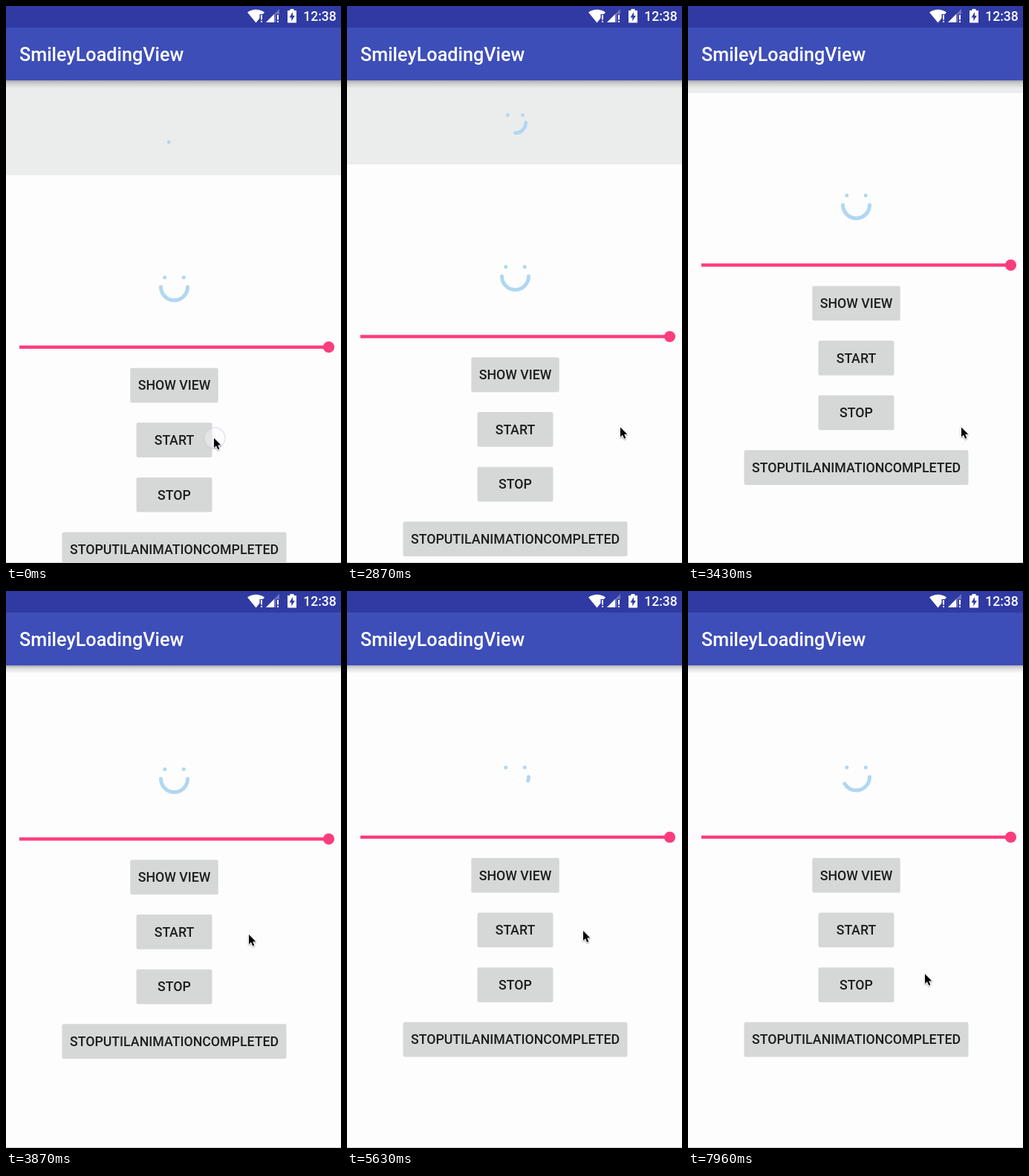
Animation, 451 px wide and 749 px high, one loop 8 s. Source, as an HTML page with a canvas:

```html
<!DOCTYPE html>
<html lang="en">
<head>
<meta charset="utf-8">
<title>SmileyLoadingView</title>
<style>
html, body { margin: 0; width: 100%; height: 100%; overflow: hidden; background: #fdfdfd; }
canvas { display: block; }
</style>
</head>
<body>
<canvas id="stage" width="451" height="749"></canvas>
<script>
const ctx = document.getElementById('stage').getContext('2d');
const W = 451, H = 749, MID = 226.5, LOOP = 8000;
const FONT = 'Roboto, "Noto Sans", sans-serif';
const BLUE = '#b0d7f2', PINK = '#fc3d7d', STATUS = '#303aa3', BAR = '#3d4eb8';
const SPIN = 0.366;  // loader speed, degrees per ms
const START = 4848;  // the lower loader begins to turn
const FLING = 3007;  // the header begins to collapse

const BUTTONS = [['SHOW VIEW', 118.5], ['START', 102], ['STOP', 102], ['STOPUTILANIMATIONCOMPLETED', 302]];

// Pointer glides: begin, end, x, y
const GLIDES = [
  [50, 950, 367, 558], [1390, 2100, 368, 566.5], [3430, 3870, 327, 462],
  [3960, 4500, 268, 471], [4790, 5350, 318, 457], [7290, 7960, 319, 515]
];

const decay = (dt, tau) => Math.exp(-Math.max(0, dt) / tau);
const spin = (from, dt) => 90 + (from - 90 + dt * SPIN) % 720;

function ease(t, begin, end) {
  const p = Math.min(1, Math.max(0, (t - begin) / (end - begin)));
  return p * p * (3 - 2 * p);
}

// Everything below the header hangs on the slider's height
function sliderY(t) {
  const rest = t < 2190 ? 445.5 : 444.5;
  return 331 + (rest - 331) * decay(t - FLING, 226) + 13.5 * decay(t, 45);
}

function pointerAt(t) {
  let x = 280, y = 581;
  for (const [begin, end, toX, toY] of GLIDES) {
    const p = ease(t, begin, end);
    x += (toX - x) * p;
    y += (toY - y) * p;
  }
  return [x, y];
}

function rect(x, y, w, h, color) {
  ctx.fillStyle = color;
  ctx.fillRect(x, y, w, h);
}

function disc(x, y, r, color) {
  ctx.fillStyle = color;
  ctx.beginPath();
  ctx.arc(x, y, r, 0, 2 * Math.PI);
  ctx.fill();
}

function poly(points, color) {
  ctx.fillStyle = color;
  ctx.beginPath();
  points.forEach(([x, y]) => ctx.lineTo(x, y));
  ctx.closePath();
  ctx.fill();
}

function text(str, x, y, size, color, align) {
  ctx.font = `500 ${size}px ${FONT}`;
  ctx.textAlign = align;
  ctx.fillStyle = color;
  ctx.fillText(str, x, y);
}

// First turn: a dot uncovers the eyes. Second turn: the mouth grows, then shrinks.
function smiley(cy, r, width, angle) {
  const turn = angle - 360;
  let sweep = 0.1, start = angle, left = angle > 225, right = angle > 315;
  if (turn > 0) {
    sweep = Math.max(0.1, Math.min(turn, 450 - turn));
    start = turn - sweep;
    left = turn <= 225;
    right = turn <= 315;
  }
  const rad = Math.PI / 180, d = r * Math.SQRT1_2;
  ctx.strokeStyle = BLUE;
  ctx.lineWidth = width;
  ctx.lineCap = 'round';
  ctx.beginPath();
  ctx.arc(MID, cy, r, start * rad, (start + sweep) * rad);
  ctx.stroke();
  if (left) disc(MID - d, cy - d, width / 2, BLUE);
  if (right) disc(MID + d, cy - d, width / 2, BLUE);
}

function button(label, y, w) {
  ctx.fillStyle = '#d6d8d7';
  ctx.beginPath();
  ctx.roundRect(MID - w / 2, y, w, 46.7, 2.5);
  ctx.fill();
  text(label, MID, y + 29.6, 17.73, '#1c1d1d', 'center');
}

function alertMark(x) {
  rect(x - 1.5, 11, 5, 12, STATUS);
  rect(x, 12, 2, 6.5, '#fff');
  rect(x, 20, 2, 2, '#fff');
}

function statusIcons() {
  // Wi-Fi
  ctx.fillStyle = '#fff';
  ctx.beginPath();
  ctx.moveTo(336.5, 22.5);
  ctx.lineTo(325, 8.5);
  ctx.quadraticCurveTo(336.5, 1, 348, 8.5);
  ctx.fill();
  alertMark(343);

  // Cell signal
  poly([[350, 22], [368, 22], [368, 4]], 'rgba(255,255,255,.3)');
  poly([[350, 22], [361, 22], [361, 11]], '#fff');
  alertMark(365);

  // Battery
  rect(382.5, 4, 5, 3, '#fff');
  rect(379, 6, 12, 16.5, '#fff');
  poly([[386, 8], [381.5, 15.5], [384.3, 15.5], [384.3, 20.5], [388.8, 13], [386, 13]], STATUS);
}

function appBar() {
  const shade = ctx.createLinearGradient(0, 100, 0, 111);
  shade.addColorStop(0, 'rgba(0,0,0,.28)');
  shade.addColorStop(0.4, 'rgba(0,0,0,.12)');
  shade.addColorStop(1, 'rgba(0,0,0,0)');
  rect(0, 100, W, 11, shade);
  rect(0, 29, W, 71, BAR);
  rect(0, 0, W, 29, STATUS);
  text('SmileyLoadingView', 18, 74, 25.2, '#fff', 'left');
  text('12:38', 444.8, 20, 17.6, '#fff', 'right');
  statusIcons();
}

function clickRing(x, y) {
  disc(x + 1, y, 14, 'rgba(253,253,253,.35)');
  ctx.strokeStyle = 'rgba(200,195,225,.45)';
  ctx.lineWidth = 1.5;
  ctx.stroke();
}

function pointer(x, y) {
  const arrow = [[0, 0], [0, 13.5], [3.1, 10.8], [5.4, 16], [7.6, 15], [5.4, 10], [9.6, 9.6]];
  ctx.save();
  ctx.translate(x, y);
  ctx.scale(0.96, 0.96);
  ctx.shadowColor = 'rgba(0,0,0,.3)';
  ctx.shadowBlur = 2;
  ctx.shadowOffsetY = 1;
  ctx.strokeStyle = '#fff';
  ctx.lineWidth = 1.8;
  ctx.lineJoin = 'round';
  poly(arrow, '#fff');
  ctx.stroke();
  ctx.shadowColor = 'transparent';
  poly(arrow, '#000');
  ctx.restore();
}

function draw(t) {
  const y = sliderY(t), edge = y - 231.3;
  rect(0, 0, W, H, '#fdfdfd');

  if (edge > 100) {
    rect(0, 100, W, edge - 100, '#ebedec');
    smiley(edge - 56.5, 14.2, 4.8, spin(120, t));
  }

  // At 540 degrees the loader is a full smile
  smiley(y - 81, 18, 5, t < START ? 540 : spin(90, t - START));

  rect(18, y - 2.2, 416, 4.4, PINK);
  disc(434.5, y, 7.6, PINK);
  BUTTONS.forEach(([label, w], i) => button(label, y + 28 + 73.6 * i, w));

  rect(0, 748, W, 1, '#d4d4d4');
  appBar();

  const tip = pointerAt(t);
  if (t < 80 || (t > 4560 && t < 4790)) clickRing(...tip);
  pointer(...tip);
}

function frame() {
  draw(performance.now() % LOOP);
  requestAnimationFrame(frame);
}
frame();
</script>
</body>
</html>
```
